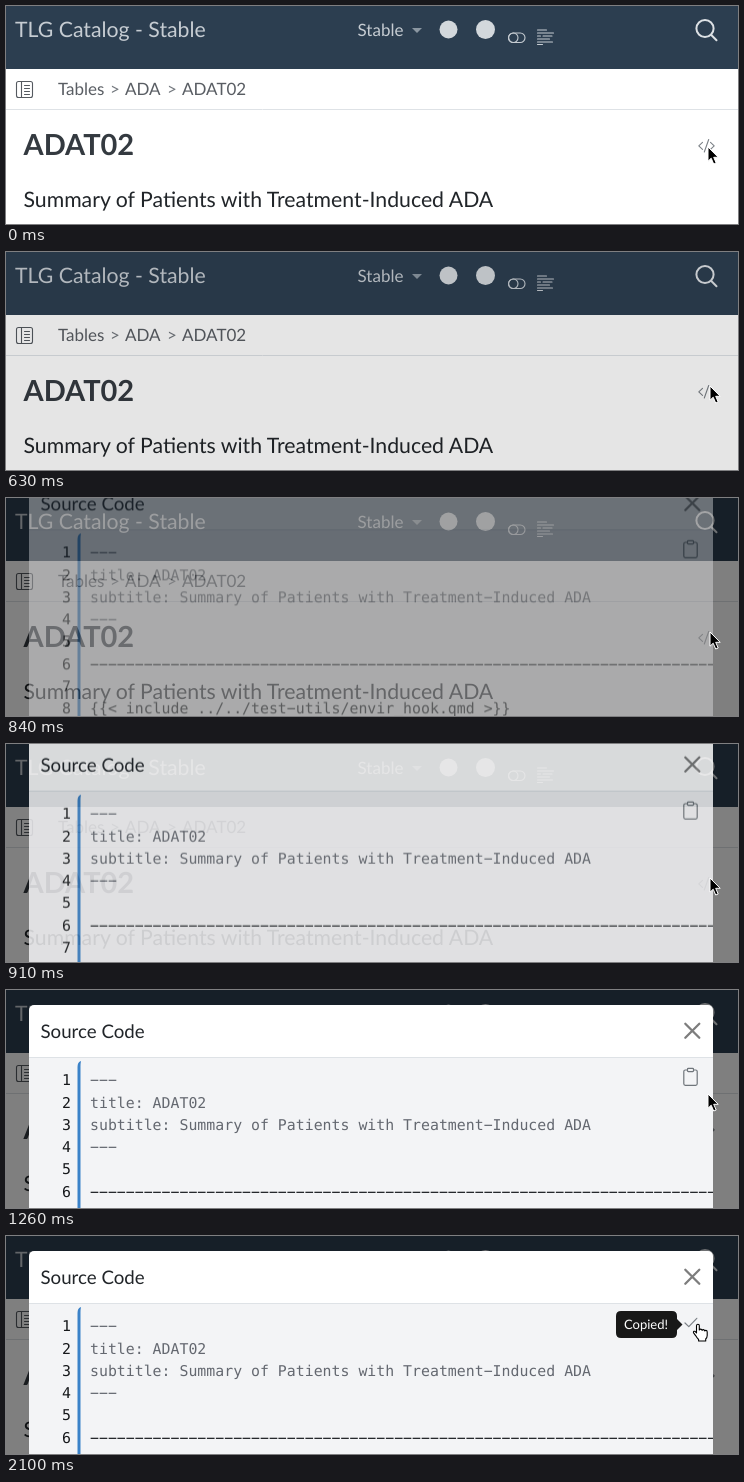
Animation, 732 px wide and 218 px high, one loop 2.38 s. Source, as an HTML page:

```html
<!DOCTYPE html>
<html lang="en">
<head>
<meta charset="utf-8">
<title>TLG Catalog - Stable</title>
<style>
  html, body { margin: 0; width: 100%; height: 100%; overflow: hidden; background: #fff; }
  svg { display: block; width: 100%; height: 100%; }
  text { font-family: Lato, sans-serif; font-size: 17px; text-rendering: geometricPrecision; }
  .line { fill: none; stroke-linecap: round; stroke-linejoin: round; }
  .brand, .lead { font-size: 21.25px; }
  .nav text { fill: #c6ccd2; }
  .nav .line { stroke: #c6ccd2; }
  .crumbs { fill: #595d63; }
  .crumbs .sep { fill: #74797f; }
  .heading { font-size: 29px; font-weight: 700; fill: #343a40; }
  .lead { fill: #212529; }
  .modal-title { font-size: 18.7px; fill: #212529; }
  .tip text { font-size: 13px; fill: #fff; }
  .code text { font-family: "DejaVu Sans Mono", monospace; font-size: 14.875px; fill: #1c1f23; }
  .code .meta { fill: #646870; }
  .code .number { fill: #16181b; text-anchor: end; }
</style>
</head>
<body>
<svg viewBox="0 0 732 218">
  <defs>
    <clipPath id="panel"><rect x="23" y="15" width="684" height="300" rx="5"/></clipPath>
  </defs>

  <g class="nav">
    <rect width="732" height="63" fill="#2c3e50"/>
    <text class="brand" x="9" y="30.5">TLG Catalog - Stable</text>
    <text x="351.5" y="30">Stable</text>
    <path d="M406 22h10l-5 5z" fill="#8b97a2"/>
    <circle cx="442.5" cy="23.5" r="9" fill="#d3d8dc"/>
    <circle cx="479.5" cy="23.5" r="9.5" fill="#d3d8dc"/>
    <g class="line" stroke-width="1.1">
      <rect x="502.5" y="27" width="16.5" height="9.5" rx="4.75"/>
      <circle cx="507.3" cy="31.75" r="4.7"/>
      <path d="M531.5 24h9M531.5 27h16M531.5 30h3M537 30h9M531.5 33h12M531.5 36h15M531.5 38.5h5"/>
    </g>
    <g class="line" style="stroke:#dde1e5" stroke-width="2">
      <circle cx="699" cy="22.5" r="8.6"/>
      <path d="M705.3 29l5.2 5.2"/>
    </g>
  </g>

  <g class="line" stroke="#555a60" stroke-width="1.1">
    <rect x="10.5" y="75.5" width="16" height="16" rx="2"/>
    <path d="M15.5 75.5v16M18.5 79.5h5M18.5 82.5h5M18.5 85.5h5M18.5 88.5h5"/>
  </g>
  <g class="crumbs">
    <text x="52" y="89">Tables</text>
    <text class="sep" x="104" y="89">&gt;</text>
    <text x="119" y="89">ADA</text>
    <text class="sep" x="161" y="89">&gt;</text>
    <text x="176" y="89">ADAT02</text>
  </g>
  <path d="M0 103.5h732" stroke="#dee2e6"/>

  <text class="heading" x="17.5" y="149">ADAT02</text>
  <text class="lead" x="17.5" y="201">Summary of Patients with Treatment-Induced ADA</text>
  <path id="sourceIcon" class="line" stroke="#7b8086" stroke-width="1.1"
        d="M702.7 133.5l-4.4 12.5M696.5 136.3l-3.7 3.5 3.7 3.5M704.5 136.3l3.7 3.5-3.7 3.5"/>

  <rect id="backdrop" width="732" height="218" opacity="0"/>

  <g id="modal" opacity="0">
    <g clip-path="url(#panel)">
      <rect x="23" y="15" width="684" height="300" fill="#fff"/>
      <rect x="23" y="68" width="684" height="250" fill="#f3f4f6"/>
      <path d="M23 67.5h684" stroke="#dee2e6"/>
      <path d="M75 71q-3.5 1-3.5 6v240h3V77q0-4 .5-6z" fill="#3b82c8"/>
      <g id="code" class="code"></g>
    </g>
    <text class="modal-title" x="34.5" y="47.5">Source Code</text>
    <path class="line" d="M679.3 33.8l14 14M693.3 33.8l-14 14" stroke="#7d7d7d" stroke-width="2.3"/>
    <g id="clipboard" class="line" stroke="#6f757b" stroke-width="1.2">
      <path d="M681.5 80h-2.2q-1.5 0-1.5 1.5v12.3q0 1.5 1.5 1.5h10.4q1.5 0 1.5-1.5V81.5q0-1.5-1.5-1.5h-2.2"/>
      <rect x="681.5" y="78.4" width="6" height="3.2" rx=".8"/>
    </g>
    <path id="check" class="line" d="M679 87l3.8 3.6 8-8.3" stroke="#7c8187" stroke-width="1.2" opacity="0"/>
    <g id="tip" class="tip" opacity="0">
      <path d="M615 75h51q5 0 5 5v3l5.500 5.500-5.500 5.500v3q0 5-5 5h-51q-5 0-5-5V80q0-5 5-5z" fill-opacity=".9"/>
      <text x="618" y="92.500">Copied!</text>
    </g>
  </g>

  <g id="cursor">
    <circle id="ring" r="28.700" fill="none" stroke="#000" stroke-width="3" opacity="0"/>
    <path id="arrow" d="M0 0v14.200l3.200-3 2.500 5.800 2.500-1-2.500-5.700h4.500z" stroke="#fff" stroke-linejoin="round"/>
    <path id="hand" opacity="0" fill="#fff" stroke="#000" stroke-width="1.100" stroke-linejoin="round"
          d="M-1.500 9V1.700q0-1.500 1.400-1.500t1.400 1.500V6q.3-.9 1.400-.9t1.400 1.300q.3-.8 1.300-.8t1.300 1.400q.3-.6 1.200-.6 1.300 0 1.300 1.600v3.500q0 2-1.500 3.500V17H.6v-1.500q-1.600-1.500-2.800-3.700l-2.200-3q-.5-1.200.5-1.500t1.700.8z"/>
  </g>
</svg>
<script>
const LOOP = 2380, TICK = 70;
const byId = id => document.getElementById(id);
const SVG_NS = "http://www.w3.org/2000/svg";

// Wide dashes keep rules close to unbroken in the code font.
const wide = text => text.replaceAll("-", "\u2212");
const codeLines = [
  wide("---"),
  "title: ADAT02",
  wide("subtitle: Summary of Patients with Treatment-Induced ADA"),
  wide("---"),
  "",
  wide("-".repeat(80)),
  "",
  wide("{{< include ../../test-utils/envir_hook.qmd >}}")
];

function addText(content, x, y, className) {
  const node = document.createElementNS(SVG_NS, "text");
  node.setAttribute("x", x);
  node.setAttribute("y", y);
  node.setAttribute("class", className);
  node.textContent = content;
  byId("code").append(node);
}

codeLines.forEach((line, i) => {
  const y = 95.2 + i * 22.31;
  addText(i + 1, 65, y, "number");
  addText(line, 84, y, i < 4 ? "meta" : "plain");
});

const tracks = [];

// Frames are [milliseconds, properties, easing to the next frame].
function track(id, frames) {
  const all = [...frames, [LOOP, frames.at(-1)[1]]];
  const keyframes = all.map(([ms, props, easing = "linear"]) => ({ offset: ms / LOOP, easing, ...props }));
  const animation = byId(id).animate(keyframes, { duration: LOOP, fill: "both" });
  animation.pause();
  tracks.push(animation);
}

const fade = opacity => ({ opacity });
const move = (x, y) => ({ transform: `translate(${x}px, ${y}px)` });

// Toggles visibility at each given time.
function toggle(id, visible, ...times) {
  track(id, [0, ...times].map((ms, i) => [ms, fade(Number(visible === (i % 2 === 0))), "step-end"]));
}

track("cursor", [
  [0, move(702, 141), "step-end"],
  [280, move(703, 141), "step-end"],
  [350, move(704, 136), "step-end"],
  [630, move(704, 134), "step-end"],
  [1120, move(704, 134)],
  [1190, move(703.5, 119)],
  [1260, move(702, 104)],
  [1400, move(698, 94)],
  [1680, move(692, 88)]
]);
toggle("arrow", true, 280, 630, 1400);
toggle("hand", false, 280, 630, 1400);
toggle("ring", false, 490, 630, 1750, 1890);
toggle("clipboard", true, 1890);
toggle("check", false, 1890);
track("sourceIcon", [
  [0, { stroke: "#7b8086" }, "step-end"],
  [280, { stroke: "#343a40" }, "step-end"],
  [630, { stroke: "#7b8086" }]
]);
track("backdrop", [[0, fade(0)], [600, fade(0)], [750, fade(.5)]]);
track("modal", [[0, fade(0)], [785, fade(0)], [935, fade(1)]]);
track("modal", [[0, move(0, -50)], [785, move(0, -50), "ease-out"], [1085, move(0, 0)]]);
track("tip", [[0, fade(0)], [1900, fade(0)], [2050, fade(1)]]);

const start = performance.now();

function render() {
  const elapsed = Math.max(0, performance.now() - start) % LOOP;
  // A small nudge lands safely past each hard change.
  const time = Math.floor(elapsed / TICK) * TICK + 0.5;
  for (const animation of tracks) animation.currentTime = time;
  requestAnimationFrame(render);
}
render();
</script>
</body>
</html>
```
